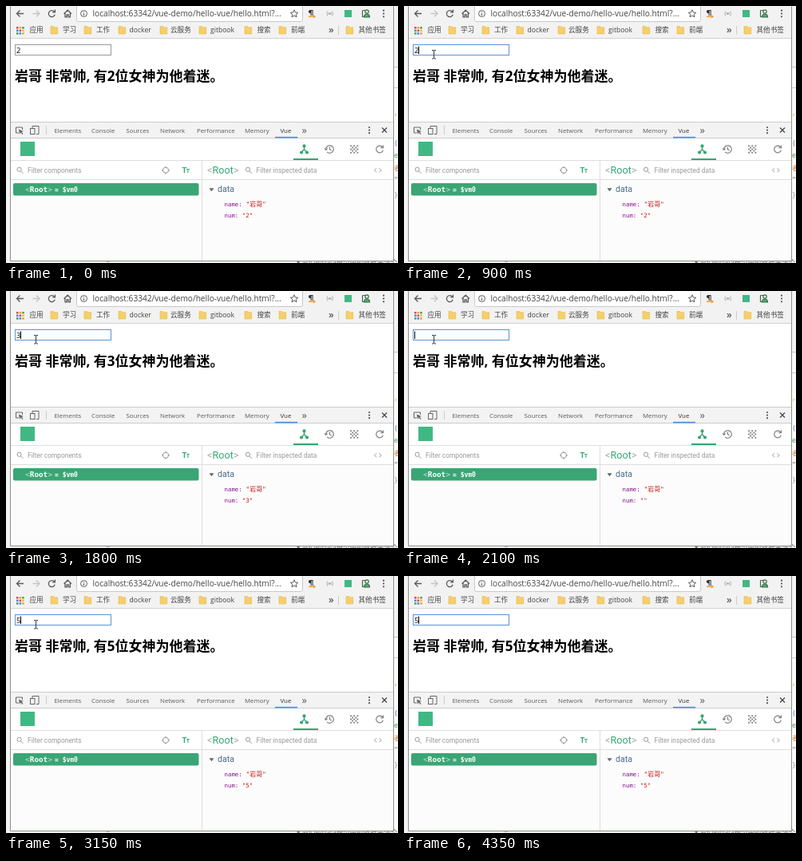
An HTML page that plays this animation: 491 px wide and 322 px high, repeating every 4500 ms.

```html
<!DOCTYPE html>
<html lang="zh">
<head>
<meta charset="utf-8">
<title>Two-way binding demo</title>
<style>
html, body { margin: 0; width: 100%; height: 100%; overflow: hidden; background: #f1f1f1; }
svg { display: block; width: 491px; height: 322px; }
text { white-space: pre; font-family: "Open Sans", "Noto Sans CJK SC", "Noto Sans CJK", sans-serif; }
.rb { font-family: Roboto, "Noto Sans CJK SC", sans-serif; }
.mono { font-family: "DejaVu Sans Mono", "Noto Sans CJK SC", "Noto Sans CJK", monospace; }
</style>
</head>
<body>
<svg id="stage" viewBox="0 0 491 322" xmlns="http://www.w3.org/2000/svg">
  <!-- editor behind the window -->
  <rect width="491" height="322" fill="#f3f3f3"/>
  <rect x="485" y="78" width="6" height="244" fill="#fbfbfb"/>
  <path d="M485 76.5h6M485 102.5h6" stroke="#c8c8c8"/>
  <g id="behind"></g>
  <path d="M126 320.5h4" stroke="#bbb"/>

  <!-- browser window -->
  <rect x="5" y="-2" width="481" height="322" fill="#fff"/>
  <rect x="6" width="479" height="41" fill="#f3f2f3"/>
  <path d="M6 40.5h479" stroke="#d2d2d2"/>
  <rect x="88.5" y="-4" width="283" height="23.5" rx="2" fill="#fff" stroke="#c9c9c9"/>
  <g fill="none" stroke="#5a5a5a" stroke-width="1.3">
    <path d="M22 9.5h-8.5M17.5 5.5l-4 4 4 4"/>
    <path d="M33.5 9.5H42M38 5.5l4 4-4 4" stroke="#c4c4c4"/>
    <path d="M60.6 7.2a4 4 0 1 0 .6 3.6M61.4 4.6v3.2h-3.2"/>
    <path d="M72.5 9.8l4.7-4.6 4.7 4.6M74 9v4.8h2.2v-3h2v3h2.2V9"/>
    <g stroke-width="1"><circle cx="97.5" cy="9.5" r="4"/><path d="M97.5 9v3M97.5 7v1"/></g>
    <path d="M361 4.8l1.4 3.2 3.3.3-2.5 2.2.8 3.3-3-1.8-3 1.8.8-3.3-2.5-2.2 3.3-.3z" stroke-width="1"/>
    <path d="M402.8 6.5q-2 3 0 6M408.6 6.5q2 3 0 6M404.4 8q-.8 1.5 0 3M407 8q.8 1.5 0 3" stroke="#aaa" stroke-width=".9"/>
  </g>
  <circle cx="405.7" cy="9.5" r="1" fill="#999"/>
  <path d="M384 5h-3a2 2 0 0 0 0 4.2h.6V12h1V6h1v6h1V5z" fill="#333"/>
  <path d="M379 12.5h6v-1.6l3.2 2.3-3.2 2.3v-1.6h-6z" fill="#ee9b33"/>
  <rect x="424" y="5" width="9" height="9" fill="#41b883"/>
  <g fill="none" stroke="#3c6b4d" stroke-width="1.2">
    <path d="M446.5 5.5h4M446.5 5.5v8h4"/><circle cx="452" cy="7" r="2.2"/><path d="M448.5 14q0-4 3.5-4t3.5 4z" fill="#4caf6a"/>
  </g>
  <g id="dots"></g>
  <g id="marks"></g>
  <path d="M416.5 25v11" stroke="#ccc"/>

  <!-- page -->
  <rect id="box" x="11.5" y="48.5" width="120" height="13" fill="#fff"/>
  <text id="field" x="13" y="58.7" font-size="9.2"></text>
  <path id="caret" d="M0 50.5v9.5" stroke="#000"/>
  <text id="head" x="11" y="94" font-size="17" font-weight="700"></text>

  <!-- devtools -->
  <rect x="6" y="146" width="479" height="19" fill="#f3f3f3"/>
  <path d="M6 145.5h479M6 165.5h479" stroke="#ccc"/>
  <path d="M50.5 150v11" stroke="#ccc"/>
  <rect x="337" y="163.8" width="28" height="1.7" fill="#4d90e8"/>
  <g fill="none" stroke="#666">
    <path d="M16 159h-3.5v-7h8v3"/>
    <path d="M16 154.5l6 2.4-2.5.8 2 2.4-1 .8-2-2.4-1.4 2.2z" fill="#666" stroke="none"/>
    <path d="M33 153v-2.5h8v10h-3"/><rect x="30.5" y="153.5" width="5.5" height="7"/>
    <path d="M471 152.5l6 6M477 152.5l-6 6" stroke="#444" stroke-width="1.2"/>
  </g>
  <rect x="18" y="170" width="18" height="18" fill="#41b883"/>
  <g fill="none" stroke="#36a673" stroke-width="1.3">
    <path d="M373.5 176v3.5l-3.5 4M373.5 179.5l3.5 4"/>
    <g fill="#36a673"><circle cx="373.5" cy="175.5" r="1.5"/><circle cx="370" cy="183.5" r="1.4"/><circle cx="377" cy="183.5" r="1.4"/></g>
  </g>
  <rect x="360" y="191" width="31" height="2" fill="#36a673"/>
  <g fill="none" stroke="#777" stroke-width="1.1">
    <path d="M400.7 179.5a4.8 4.8 0 1 1 1.5 3.5M399 178.5l1.8 2 1.8-2M405.5 176.5v3.2l2.3 1.4"/>
    <path d="M471.7 177a4.4 4.4 0 1 0 .6 3.7M472.4 174.5v3.3h-3.3"/>
  </g>
  <g id="grid" fill="#777"></g>
  <path d="M6 193.5h479M6 217.5h479M245.5 193.5V319" stroke="#dedede" fill="none"/>
  <rect x="6" y="218" width="239" height="101" fill="#fcfcfc"/>
  <rect x="246" y="218" width="239" height="101" fill="#fcfcfc"/>
  <g fill="none" stroke="#999">
    <circle cx="16.6" cy="204.8" r="2.6"/><path d="M18.5 206.8l3 3"/>
    <circle cx="303" cy="204.8" r="2.6"/><path d="M305 206.8l3 3"/>
    <circle cx="200" cy="205.8" r="3.6"/><path d="M200 200.8v2.2M200 208.6v2.2M195 205.8h2.2M202.8 205.8h2.2"/>
    <path d="M464 203.3l-2.5 2.5 2.5 2.5M467.5 203.3l2.5 2.5-2.5 2.5"/>
  </g>
  <rect x="9" y="222" width="232.500" height="15.500" rx="2" fill="#3aa675"/>
  <path d="M254.500 228.200h6l-3 4z" fill="#666"/>
  <g id="labels"></g>
  <text class="mono" id="num" x="295.800" y="265" font-size="7.400" fill="#c41a16"></text>
  <path d="M5.500 0V319.500H485.500V0" fill="none" stroke="#8d9488"/>

  <g id="arrow"><path d="M0 0v11.500l2.700-2.500 1.800 4.200 1.900-.8-1.800-4.100h3.700z" fill="#fff" stroke="#000" stroke-width=".9"/></g>
  <path id="beam" d="M35 55.500h2l.5.500.5-.500h2M37.500 56v9.500M35 66h2l.5-.500.5.500h2" fill="none" stroke="#222" stroke-width=".9"/>
</svg>
<script>
const $ = id => document.getElementById(id);
const NS = "http://www.w3.org/2000/svg";

function add(parent, tag, attrs, text) {
  const el = document.createElementNS(NS, tag);
  for (const k in attrs) el.setAttribute(k, attrs[k]);
  if (text) el.textContent = text;
  $(parent).appendChild(el);
}
function label(x, y, size, fill, text, cls = "", weight = 400, parent = "labels") {
  add(parent, "text", { x, y, "font-size": size, fill, class: cls, "font-weight": weight }, text);
}

// editor fragments at the window's edges
[[137, "#cc9a4a", "，"], [175, "#4a6fb5", "("], [190, "#4c9a55", "e"], [206, "#d08a3a", "者"], [221, "#888", "”"], [240, "#999", "}"]]
  .forEach(([y, c, s]) => label(486, y, 8, c, s, "mono", 400, "behind"));
label(364, 324, 8.5, "#777", "▾ 我们的data模型中的数据来渲染页面", "", 400, "behind");

// menu dots
[[473, 5.7, 3.8], [455, 152, 3.6]].forEach(([cx, y, gap]) => {
  for (let i = 0; i < 3; i++) add("dots", "circle", { cx, cy: y + i * gap, r: 1.1, fill: "#555" });
});
$("stage").insertBefore($("dots"), $("labels").parentNode === $("stage") ? $("labels") : null);

// bookmarks bar
const hues = ["#e0493e", "#f0a030", "#4a9e55", "#4285f4", "#e0493e", "#f0b840", "#4a9e55", "#4285f4", "#f0a030"];
hues.forEach((fill, i) => add("marks", "rect", {
  x: 13 + i % 3 * 3.6, y: 26 + Math.floor(i / 3) * 3.6, width: 2.5, height: 2.5, fill
}));
label(29.5, 33.3, 8.6, "#444", "应用", "", 400, "marks");
[[56, 71, "学习"], [98, 113, "工作"], [141, 154.5, "docker"], [193, 206, "云服务"], [242, 256, "gitbook"],
 [299, 314.5, "搜索"], [342, 357, "前端"], [426, 441.5, "其他书签"]].forEach(([x, tx, s]) => {
  add("marks", "path", { d: `M${x} 25.500h3.500l1 1.200h4.200v8.300h-8.700z`, fill: "#f5cf6a", stroke: "#e3b94f", "stroke-width": .6 });
  label(tx, 33.3, 8.6, "#444", s, "", 400, "marks");
});
label(404, 34, 12, "#555", "»", "", 600, "marks");

// address and tabs
label(108.5, 13, 10.15, "#444", "localhost:63342/vue-demo/hello-vue/hello.html?...");
[[60.5, "Elements"], [107, "Console"], [150.5, "Sources"], [193, "Network"], [239, "Performance"], [299, "Memory"], [343.5, "Vue"]]
  .forEach(([x, s]) => label(x, 158.7, 7.85, s === "Vue" ? "#333" : "#5a5a5a", s));
label(370.5, 159.5, 13, "#555", "»");

for (let i = 0; i < 13; i++) add("grid", "circle", {
  cx: 432 + (i * 2 % 5) * 2.1, cy: 175.3 + Math.floor(i * 2 / 5) * 2.1, r: 1
});

// panels
label(27, 208.7, 8.4, "#999", "Filter components", "rb");
label(313.5, 208.7, 8.4, "#999", "Filter inspected data", "rb");
label(220.5, 208.7, 9.5, "#36a673", "T", "rb", 700);
label(225.8, 208.7, 7, "#36a673", "T", "rb", 700);
label(252, 209.8, 12.6, "#aaa", "<", "rb");
label(258.5, 209.8, 12.6, "#36a673", "Root", "rb");
label(285, 209.8, 12.6, "#aaa", ">", "rb");
label(24, 233, 9.3, "#c4e6d6", "<", "mono");
label(29.8, 233, 9.3, "#fff", "Root", "mono", 700);
label(52.5, 233, 9.3, "#c4e6d6", ">", "mono");
label(61, 233, 8, "#fff", "= $vm0", "mono", 700);
label(265, 233.2, 10.6, "#4a6a8a", "data", "rb");
label(273.5, 251, 7.4, "#881391", "name:", "mono");
label(300.5, 251, 7.9, "#c41a16", "\"岩哥\"", "mono");
label(273.5, 265, 7.4, "#881391", "num:", "mono");

// [start ms, value]
const values = [[0, "2"], [1500, ""], [1800, "3"], [2100, ""], [2250, "4"], [2850, ""], [3150, "5"]];
const carets = [[0, 0], [600, 1], [1050, 0], [1500, 1], [2700, 0], [2850, 1], [3750, 0], [4200, 1]];
// pointer: null is off stage, "beam" rests over the field
const pointer = [[0, null], [300, [290, 24]], [450, [140, 44]], [600, "beam"], [3450, [215, 100]],
  [3600, [340, 52]], [3750, [398, 27]], [3900, [412, 3]], [4050, null]];
const at = (table, t) => table.filter(row => row[0] <= t).pop()[1];
const show = (el, on) => el.setAttribute("visibility", on ? "visible" : "hidden");
let last = -1;

function draw(now) {
  const t = Math.floor(now % 4500 / 150) * 150;
  if (t !== last) {
    last = t;
    const v = at(values, t), p = at(pointer, t);
    $("field").textContent = v;
    $("head").textContent = `岩哥 非常帅, 有${v}位女神为他着迷。`;
    $("num").textContent = `"${v}"`;
    $("box").setAttribute("stroke", t < 600 ? "#9a9a9a" : "#5b94d6");
    $("caret").setAttribute("transform", `translate(${v ? 18.5 : 13.5} 0)`);
    show($("caret"), at(carets, t));
    show($("beam"), p === "beam");
    show($("arrow"), Array.isArray(p));
    if (Array.isArray(p)) $("arrow").setAttribute("transform", `translate(${p})`);
  }
  requestAnimationFrame(draw);
}
draw(performance.now());
</script>
</body>
</html>
```
